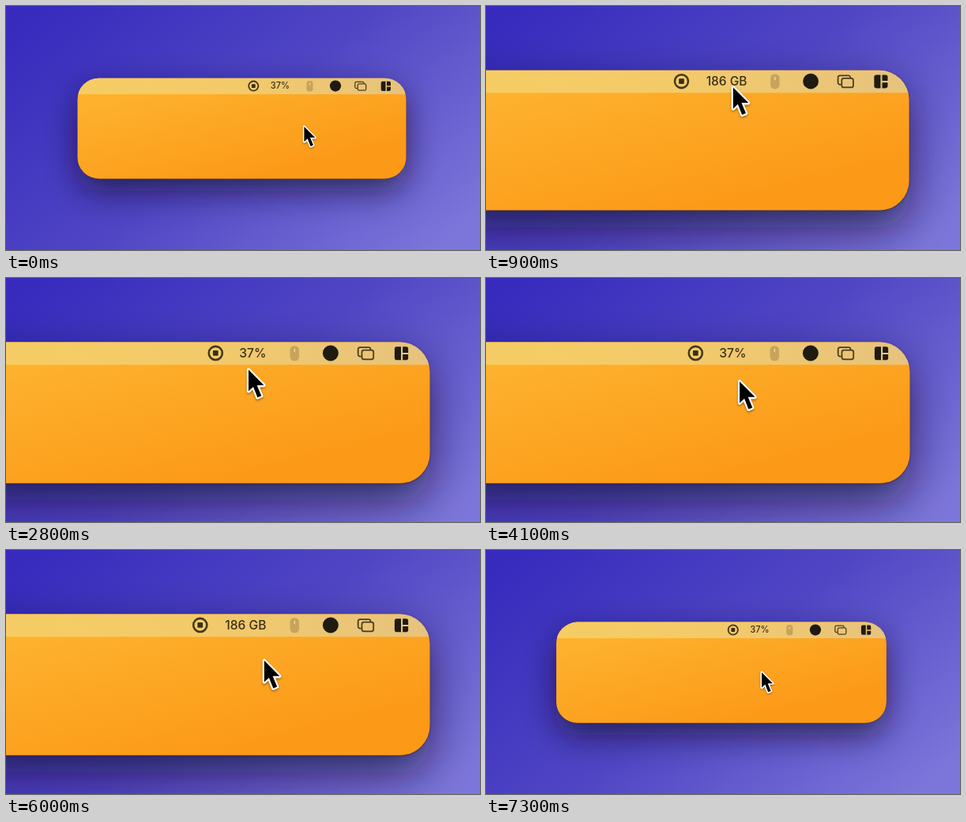
An HTML page for the animation above (7.4 s loop, 600 by 310 pixels).

```html
<!DOCTYPE html>
<html lang="en">
<head>
<meta charset="utf-8">
<title>Menu bar toggle</title>
<style>
  html, body { margin: 0; width: 100%; height: 100%; overflow: hidden; background: #4a40c2; }
  svg { display: block; width: 100vw; height: 100vh; }
  text { font: 500 11.1px Inter, Roboto, sans-serif; fill: #3a2f17; text-anchor: end; }
</style>
</head>
<body>
<svg viewBox="0 0 600 310" preserveAspectRatio="none">
  <defs>
    <linearGradient id="sky" gradientUnits="userSpaceOnUse" x1="110" y1="-60" x2="480" y2="370">
      <stop offset="0" stop-color="#362bbd"/>
      <stop offset=".5" stop-color="#5046c4"/>
      <stop offset="1" stop-color="#7d76da"/>
    </linearGradient>
    <linearGradient id="amber" gradientUnits="userSpaceOnUse" x1="250" y1="85" x2="285" y2="225">
      <stop offset="0" stop-color="#fdb22e"/>
      <stop offset="1" stop-color="#fc9a18"/>
    </linearGradient>
    <linearGradient id="strip">
      <stop offset="0" stop-color="#f6cd62"/>
      <stop offset=".5" stop-color="#f3ca69"/>
      <stop offset="1" stop-color="#e6c37e"/>
    </linearGradient>
    <filter id="soft" x="-30%" y="-100%" width="160%" height="300%">
      <feGaussianBlur stdDeviation="20"/>
    </filter>
    <filter id="edge" x="-10%" y="-10%" width="120%" height="120%">
      <feGaussianBlur stdDeviation=".7"/>
    </filter>
    <filter id="drop" x="-50%" y="-30%" width="200%" height="180%">
      <feDropShadow dx="0" dy="1.2" stdDeviation="1.2" flood-opacity=".4"/>
    </filter>
    <clipPath id="round"><rect x="90.5" y="91.7" width="416" height="127.7" rx="27"/></clipPath>
  </defs>

  <rect width="600" height="310" fill="url(#sky)"/>

  <g id="scene">
    <rect x="90.5" y="107" width="416" height="127.7" rx="27" fill="#120c26" opacity=".68" filter="url(#soft)"/>
    <rect x="90.5" y="92.2" width="416" height="127.7" rx="27" fill="#3a2420" opacity=".7" filter="url(#edge)"/>
    <g clip-path="url(#round)">
      <rect x="90" y="91" width="417" height="129" fill="url(#amber)"/>
      <rect x="90" y="91" width="417" height="21.1" fill="url(#strip)"/>
    </g>

    <g id="record">
      <circle cy="101.6" r="6.1" fill="none" stroke="#44371a" stroke-width="1.8"/>
      <rect x="-2.4" y="99.2" width="4.8" height="4.8" rx=".7" fill="#3a2f17"/>
    </g>
    <text id="label" x="359" y="105.4"></text>
    <rect x="380.4" y="95" width="8.2" height="13.6" rx="3.7" fill="#c8a35c"/>
    <rect x="383.8" y="97.6" width="1.4" height="3" rx=".7" fill="#efd08a"/>
    <circle cx="417" cy="101.6" r="7.1" fill="#1f1a12"/>
    <g fill="none" stroke="#4a3b1c" stroke-width="1.25">
      <path d="M444.6 104.6h-1a1.8 1.8 0 0 1-1.8-1.8v-4.7a1.8 1.8 0 0 1 1.8-1.8h7.6a1.8 1.8 0 0 1 1.8 1.8v.4"/>
      <rect x="445.2" y="98.9" width="10.5" height="8.3" rx="1.8"/>
    </g>
    <g fill="#211b11">
      <path d="M480.5 95.7v12.2h-3.8a2 2 0 0 1-2-2v-8.2a2 2 0 0 1 2-2z"/>
      <path d="M482 95.7h3a2 2 0 0 1 2 2v3.5h-5z"/>
      <path d="M482 102.7h5v3.2a2 2 0 0 1-2 2h-3z"/>
    </g>

    <path id="cursor" d="M1.4 3.2V22.6L5.7 18.6L9.5 28.3L13 26.8L9 17.3H15.3Z" fill="#000"
      stroke="#fff" stroke-width="3" stroke-linejoin="round" paint-order="stroke" filter="url(#drop)"/>
  </g>
</svg>
<script>
const LOOP = 7400, STEP = 100;
const ZOOM = { scale: 1.404, x: -174.6, y: -47.2, start: 0, end: 6.2, speed: 5.9 };
const CLICKS = [0.8, 2.6, 4.5, 6.4];

// Pointer path: seconds, x, y
const PATH = [
  [0, 376, 150], [.4, 357.5, 121], [.7, 345, 104], [.9, 345, 104],
  [1.5, 394.3, 167.5], [1.7, 394.3, 168], [2.4, 342, 105], [2.6, 341, 106],
  [2.8, 341.6, 113.4], [3.4, 380, 158], [4.1, 351.6, 124.1], [4.4, 346, 105],
  [4.6, 346, 105], [5.2, 385, 164], [6, 355.8, 130.5], [6.3, 346, 105],
  [6.5, 346, 106], [7.3, 348, 152]
];

const $ = id => document.getElementById(id);
const scene = $('scene'), record = $('record'), label = $('label'), cursor = $('cursor');

// Critically damped spring, 0 to 1
function spring(t) {
  const a = Math.max(0, t) * ZOOM.speed;
  return 1 - (1 + a) * Math.exp(-a);
}

// Slope at a key, flat where the motion turns
function slope(i, k) {
  const a = PATH[i - 1], b = PATH[i], c = PATH[i + 1];
  if (!a || !c) return 0;
  const u = (b[k] - a[k]) / (b[0] - a[0]), v = (c[k] - b[k]) / (c[0] - b[0]);
  return u * v <= 0 ? 0 : 2 * u * v / (u + v);
}

function pointer(t, k) {
  let i = 0;
  while (i < PATH.length - 2 && PATH[i + 1][0] <= t) i++;
  const a = PATH[i], b = PATH[i + 1], h = b[0] - a[0];
  const p = Math.min(1, (t - a[0]) / h), q = 1 - p;
  return q * q * (1 + 2 * p) * a[k] + p * p * (3 - 2 * p) * b[k]
    + h * p * q * (q * slope(i, k) - p * slope(i + 1, k));
}

function draw(t) {
  const z = spring(t - ZOOM.start) - spring(t - ZOOM.end);
  const s = 1 + (ZOOM.scale - 1) * z;
  scene.setAttribute('transform', `matrix(${s} 0 0 ${s} ${ZOOM.x * z} ${ZOOM.y * z})`);

  const size = CLICKS.filter(c => c <= t).length % 2;
  label.textContent = size ? '186 GB' : '37%';
  record.setAttribute('transform', `translate(${size ? 299.4 : 313.3} 0)`);
  cursor.setAttribute('transform', `translate(${pointer(t, 1)} ${pointer(t, 2)})`);
}

const begin = performance.now();
function tick() {
  const ms = (performance.now() - begin) % LOOP;
  draw(Math.floor(ms / STEP) * STEP / 1000);
  requestAnimationFrame(tick);
}
tick();
</script>
</body>
</html>
```
